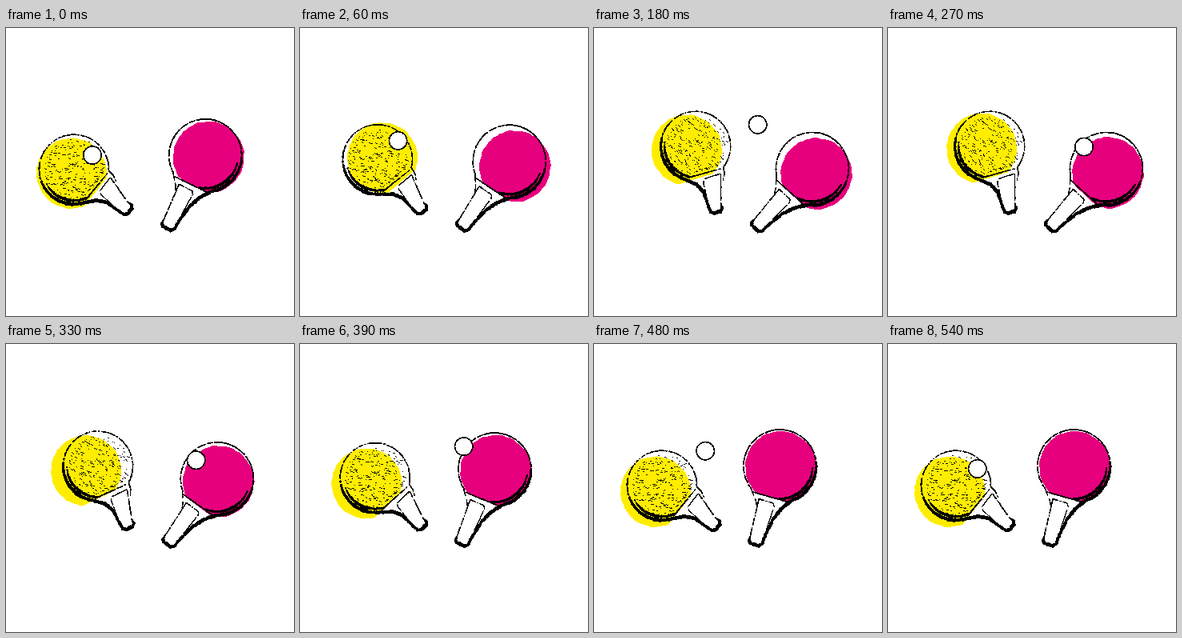
Write an HTML page that moves like this. It is 360x360 px and loops after 0.57 s.

```html
<!DOCTYPE html>
<html lang="en">
<head>
<meta charset="utf-8">
<title>Table tennis</title>
<style>
  html, body { margin: 0; width: 100%; height: 100%; overflow: hidden; background: #fff; }
  svg { display: block; width: 100vw; height: 100vh; }
</style>
</head>
<body>
<svg id="stage" viewBox="0 0 360 360" shape-rendering="crispEdges"></svg>
<script>
const STEP = 30, COUNT = 19, RAD = Math.PI / 180;
const stage = document.getElementById('stage');

function add(parent, tag, attrs) {
  const el = document.createElementNS('http://www.w3.org/2000/svg', tag);
  for (const k in attrs) el.setAttribute(k, attrs[k]);
  return parent.appendChild(el);
}

let seed = 4177;
const rnd = () => (seed = (seed * 16807) % 2147483647) / 2147483647;
const mix = (a, b, t) => a + (b - a) * t;
const poly = pts => 'M' + pts.map(p => p[0].toFixed(2) + ' ' + p[1].toFixed(2)).join('L') + 'Z';

// Ragged ink line through [x, y, width] points.
function ink(parent, pts, gaps) {
  const line = [];
  for (let i = 1; i < pts.length; i++) {
    const a = pts[i - 1], b = pts[i];
    const n = Math.ceil(Math.hypot(b[0] - a[0], b[1] - a[1]) / 2);
    for (let j = 0; j < n; j++) line.push(a.map((v, k) => mix(v, b[k], j / n)));
  }
  line.push(pts[pts.length - 1]);
  const left = [], right = [];
  line.forEach(([x, y, w], i) => {
    const p = line[Math.max(0, i - 1)], q = line[Math.min(line.length - 1, i + 1)];
    const len = Math.hypot(q[0] - p[0], q[1] - p[1]) || 1;
    const nx = (p[1] - q[1]) / len, ny = (q[0] - p[0]) / len;
    const ink = w < 2.4 && rnd() < gaps ? 0 : w;
    const a = ink * (0.4 + 0.25 * rnd()), b = ink * (0.4 + 0.25 * rnd());
    left.push([x + nx * a, y + ny * a]);
    right.unshift([x - nx * b, y - ny * b]);
  });
  add(parent, 'path', { d: poly(left.concat(right)) });
}

// Arc whose pen pressure peaks at angle `heavy`.
function arc(r, from, to, heavy, thin, press) {
  const pts = [];
  for (let a = from; a <= to; a += 6) {
    const p = Math.max(0, Math.cos((a - heavy) * RAD));
    pts.push([r * Math.cos(a * RAD), r * Math.sin(a * RAD), thin + press * p * p]);
  }
  return pts;
}

// Rough disc cut flat on the handle side.
function rubber(color, r, cut) {
  const pts = arc(r, 0, 354, 0, 0, 0).map(([x, y]) => {
    const k = 0.985 + 0.03 * rnd();
    return [x * k, Math.min(cut, y * k)];
  });
  return add(stage, 'path', { d: poly(pts), fill: color });
}

function scratches(parent, count) {
  let d = '';
  for (let i = 0; i < count; i++) {
    const r = 38 * Math.sqrt(rnd()), k = 2 * Math.PI * rnd();
    const a = (52 + 36 * (rnd() - 0.5)) * RAD, len = 0.8 + 4 * rnd() * rnd();
    const y = Math.min(30, r * Math.sin(k));
    d += `M${(r * Math.cos(k)).toFixed(1)} ${y.toFixed(1)}l${(len * Math.cos(a)).toFixed(1)} ${(len * Math.sin(a)).toFixed(1)}`;
  }
  add(parent, 'path', { d, fill: 'none', stroke: '#000', 'stroke-width': 0.95 });
}

// Bat with its head centred on 0,0 and the handle down; the shaded edge faces `side`.
function drawBat({ side, r, heavy, far, near, top, endFar, endNear, end, gaps, grain }) {
  const g = add(stage, 'g', {});
  const m = add(g, 'g', { transform: `scale(${side} 1)` });
  add(m, 'path', { d: poly([[far, top], [near, top], [endNear, end], [endFar, end]]), fill: '#fff' });
  scratches(g, grain);
  ink(m, [
    [far, top + 9, 1.4], [far - 4, top + 2, 1.5],
    ...arc(r, 126, 414, 360 + heavy, 1.7, 2.6),
    [near + 9, top + 4, 4.5], [near + 3, mix(top, end, 0.35), 4], [endNear + 1, mix(top, end, 0.7), 3.5],
    [endNear, end - 3, 4], [endNear - 3, end, 4.5], [endFar + 3, end, 4.5],
    [endFar, end - 3, 3.5], [endFar, end - 9, 1.7], [far, top, 1.5]
  ], gaps);
  ink(m, arc(r - 4.5, heavy - 50, heavy + 45, heavy, 0.8, 2.8), gaps);
  ink(m, [[-r / 2, top - 6, 1.5], [r / 2, top - 7, 2]], gaps / 2);
  ink(m, [[far, top, 1.5], [near - 2, top, 1.5], [near, top + 4, 1.4], [endNear, mix(top, end, 0.6), 1.2]], gaps);
  return g;
}

// Linear track through [step, value, ...] keys.
function track(keys, s) {
  const i = keys.findIndex(k => k[0] > s), a = keys[i - 1], b = keys[i];
  return a.slice(1).map((v, k) => mix(v, b[k + 1], (s - a[0]) / (b[0] - a[0])));
}

// Each bat swings about its handle end; its colour disc drifts off the head.
const bats = [
  {
    side: -1, pivot: [152, 229], reach: 85,
    tilt: [[0, 52], [6, 17], [10, 17], [14, 52], [19, 52]],
    drift: [[0, -3, 5], [2, 6, -2], [4, -12, 6], [9, -10, 3], [11, -15, 6], [14, -8, 8], [18, -8, 8], [19, -3, 5]],
    disc: rubber('#ffed00', 44, 38),
    look: { r: 43.5, heavy: 25, far: -20, near: 4, top: 42, endFar: -9, endNear: 6, end: 87, gaps: 0.15, grain: 260 }
  },
  {
    side: 1, pivot: [202, 252], reach: 104,
    tilt: [[0, 27], [4, 43], [10, 43], [14, 17], [18, 17], [19, 27]],
    drift: [[0, 4, 2], [2, 7, 6], [4, 7, 7], [9, 2, 5], [14, 1, 1], [18, 1, 1], [19, 4, 2]],
    disc: rubber('#e6007e', 44.5, 40),
    look: { r: 45.5, heavy: 35, far: -13, near: 8, top: 47, endFar: -10, endNear: 7, end: 103, gaps: 0.08, grain: 0 }
  }
];
for (const b of bats) b.el = drawBat({ side: b.side, ...b.look });

const ball = add(stage, 'circle', { r: 11.2, fill: '#fff', stroke: '#000', 'stroke-width': 1.6 });

function place(el, x, y, turn) {
  el.setAttribute('transform', `translate(${x.toFixed(2)} ${y.toFixed(2)}) rotate(${turn.toFixed(2)})`);
}

function draw(ms) {
  const s = Math.floor(ms / STEP) % COUNT;
  for (const b of bats) {
    const turn = b.side * track(b.tilt, s)[0];
    const x = b.pivot[0] + b.reach * Math.sin(turn * RAD);
    const y = b.pivot[1] - b.reach * Math.cos(turn * RAD);
    const [dx, dy] = track(b.drift, s);
    place(b.el, x, y, turn);
    place(b.disc, x + dx, y + dy, turn);
  }
  // Back and forth in x; an arc in y, a little higher on the way out.
  const p = 2 * Math.PI * s / COUNT, c = Math.cos(p);
  ball.setAttribute('cx', (177 - 69 * c).toFixed(2));
  ball.setAttribute('cy', (119 - 4 * Math.sin(p) + (35.5 + 4.5 * c) * c * c).toFixed(2));
}

let start = null;
function tick(now) {
  if (start === null) start = now;
  draw(Math.max(0, now - start));
  requestAnimationFrame(tick);
}
draw(0);
requestAnimationFrame(tick);
</script>
</body>
</html>
```
